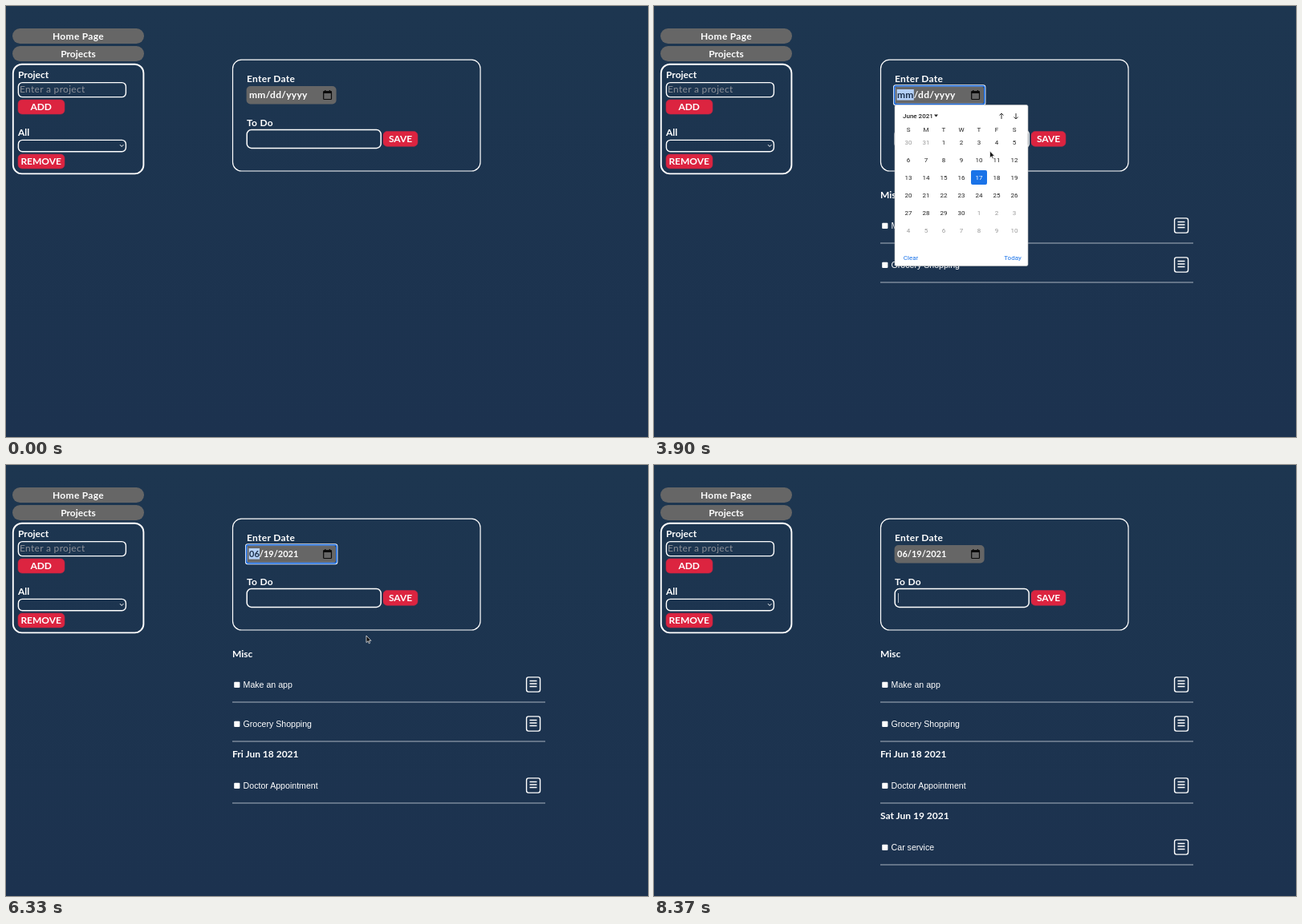
An HTML page for the animation above (8.4 s loop, 800 px wide and 538 px high).

```html
<!DOCTYPE html>
<html lang="en">
<head>
<meta charset="utf-8">
<title>To-do list</title>
<style>
  html, body { margin: 0; width: 100%; height: 100%; overflow: hidden; background: #1c3450; }
  svg { display: block; width: 800px; height: 538px; }
  text { font: 700 12px Lato, sans-serif; fill: #fff; white-space: pre; }
  .wide { letter-spacing: .3px; }
  .mid { text-anchor: middle; }
  .hint { font-weight: 400; fill: #8b8f97; }
  .typed { font-weight: 400; }
  .task { font: 10.6px "Liberation Sans", Arial, sans-serif; }
  .pill { fill: #666; }
  .btn { fill: #dc2440; stroke: #b82745; stroke-width: .6; }
  .box { fill: none; stroke: #fff; stroke-width: 1.4; }
  .rule { stroke: #a9b3bf; }
  .digits { font-size: 11px; }
  .picker text { font: 8px Roboto, sans-serif; fill: #222; }
  .picker .out { fill: #999; }
  .picker .sel { fill: #fff; }
  .picker .link { fill: #1a73e8; }
</style>
</head>
<body>
<svg viewBox="0 0 800 538">
  <defs>
    <linearGradient id="sky" x2="0" y2="1">
      <stop stop-color="#1d3650"/><stop offset="1" stop-color="#1c324f"/>
    </linearGradient>
    <g id="menu">
      <rect class="box" x="648.6" y="-9.1" width="17" height="18.2" rx="2.5"/>
      <path d="M652.5-4.6h9M652.5-1h9M652.5 2.6h9" stroke="#fff" stroke-width="1.5"/>
    </g>
  </defs>
  <rect width="800" height="538" fill="url(#sky)"/>

  <rect class="pill" x="8" y="28" width="164" height="19" rx="9.5"/>
  <rect class="pill" x="8" y="50" width="164" height="19" rx="9.5"/>
  <text class="mid wide" x="90" y="42">Home Page</text>
  <text class="mid" x="90" y="64">Projects</text>

  <rect class="box" x="8.8" y="72.8" width="162.6" height="136.6" rx="11" style="stroke-width:1.9"/>
  <text x="15" y="90.4">Project</text>
  <rect class="box" x="15.4" y="95.6" width="134" height="18" rx="5"/>
  <text class="hint wide" x="17" y="108">Enter a project</text>
  <rect class="btn" x="15" y="117" width="58" height="18" rx="5"/>
  <text class="mid" x="43.7" y="129.6">ADD</text>
  <text x="15" y="162.4">All</text>
  <rect class="box" x="15.4" y="167.4" width="134" height="14.4" rx="5"/>
  <path d="M142 173.2l2.2 2.3 2.2-2.3" fill="none" stroke="#fff"/>
  <rect class="btn" x="15" y="185" width="58" height="18" rx="5"/>
  <text class="mid" x="43.7" y="197.6">REMOVE</text>

  <rect class="box" x="282.5" y="67.2" width="308.6" height="138.8" rx="11" style="stroke-width:1.2"/>
  <text class="wide" x="300" y="95.3">Enter Date</text>
  <rect class="pill" x="299.6" y="100" width="112" height="22.4" rx="5"/>
  <g id="focus">
    <rect x="299.2" y="99.4" width="113" height="23.6" rx="2" fill="none" stroke="#fff" stroke-width="2.4"/>
    <rect x="299.6" y="99.8" width="112.2" height="22.8" rx="2" fill="none" stroke="#1769e0" stroke-width="1.6"/>
    <rect id="mark" x="302.6" y="104" height="13.6" fill="#b4d0f8"/>
  </g>
  <text id="date" x="303" y="114.7"><tspan id="month"></tspan><tspan id="rest"></tspan></text>
  <g fill="none" stroke="#0b0b0b">
    <rect x="395.7" y="106.7" width="9.8" height="9.8" rx=".8" stroke-width="1.2"/>
    <path d="M395.5 107.8h10.2" stroke-width="2.4"/>
    <path d="M397.8 105v2M403.4 105v2" stroke-width="1.3"/>
  </g>
  <text class="wide" x="300" y="149.7">To Do</text>
  <rect class="box" x="300.2" y="154.6" width="167" height="22.8" rx="5.5" style="stroke-width:1.5"/>
  <text class="typed" id="typed" x="304" y="169.3"></text>
  <path id="caret" d="M.5 160v12" stroke="#d5dae0" stroke-width=".8"/>
  <rect class="btn" x="470" y="156.5" width="43" height="18.8" rx="5"/>
  <text class="mid" x="491.6" y="169.6">SAVE</text>

  <g id="list"></g>
  <g id="picker" class="picker"></g>
  <path id="cursor" d="M0 0v8.6l2-1.8 1.3 3 1.3-.6-1.3-2.9h2.7z" fill="#111" stroke="#fff" stroke-width=".7"/>
</svg>
<script>
const LOOP = 8400;
const $ = id => document.getElementById(id);

// Each entry: typing start, ms per key, moment of saving, row centre
const entries = [
  { text: 'Make an app', start: 390, step: 60, save: 1200, y: 274, head: 'Misc', headY: 240 },
  { text: 'Grocery Shopping', start: 1530, step: 65, save: 2700, y: 323 },
  { text: 'Doctor Appointment', start: 4460, step: 38, save: 5280, y: 400, head: 'Fri Jun 18 2021', headY: 365.2 },
  { text: 'Car service', start: 6480, step: 42, save: 7020, y: 477, head: 'Sat Jun 19 2021', headY: 441.5 }
];

// Spans of time
const todoFocus = [[300, 3510], [4425, 5850], [6420, LOOP]];
const dateFocus = [[3510, 4425], [5850, 6420]];
const pickerOpen = [[3540, 4380], [5940, 6330]];

// Pointer paths: [time, x, y]
const paths = [
  [[60, 392, 250], [270, 380, 180]],
  [[3180, 365, 154], [3270, 371, 126], [3450, 400, 111], [3600, 400, 111],
   [4080, 427, 213], [4380, 427, 213], [4425, 400, 181]],
  [[5640, 385, 152], [5820, 407, 112], [5970, 407, 112],
   [6180, 449, 213], [6330, 449, 213], [6420, 400, 181]]
];

const within = (spans, t) => spans.some(([a, b]) => t >= a && t < b);
const show = (el, on) => el.setAttribute('visibility', on ? 'visible' : 'hidden');

for (const e of entries) {
  const head = e.head ? `<text x="282" y="${e.headY}">${e.head}</text>` : '';
  $('list').insertAdjacentHTML('beforeend', `<g>${head}
    <rect x="284.2" y="${e.y - 3.2}" width="7.2" height="7.2" rx="1" fill="#fff"/>
    <text class="task" x="295.6" y="${e.y + 3.8}">${e.text}</text>
    <use href="#menu" y="${e.y}"/>
    <path class="rule" d="M282 ${e.y + 22}h390"/></g>`);
  e.row = $('list').lastElementChild;
}

function drawPicker(day) {
  const label = (x, y, s, c = '') => `<text class="mid ${c}" x="${x}" y="${y}">${s}</text>`;
  let out = '<rect x="300" y="123.5" width="166" height="201" rx="2" fill="#fff" stroke="#bbb" stroke-width=".6"/>'
    + '<text x="310" y="140" style="font-weight:500">June 2021</text>'
    + '<path d="M349 135.5h5l-2.5 3z" fill="#222"/>'
    + '<path d="M433 141v-7m-2.5 2.5l2.5-2.5 2.5 2.5M451 134v7m-2.5-2.5l2.5 2.5 2.5-2.5" fill="none" stroke="#333"/>';
  [...'SMTWTFS'].forEach((d, i) => { out += label(317 + i * 22, 157, d); });
  for (let i = 0; i < 42; i++) {
    const x = 317 + i % 7 * 22, y = 173 + Math.floor(i / 7) * 22;
    const n = i - 1, inside = n > 0 && n < 31;
    if (n === day) out += `<rect x="${x - 10}" y="${y - 12}" width="20" height="18" rx="2" fill="#1a73e8"/>`;
    out += label(x, y, inside ? n : n > 30 ? n - 30 : n + 31, n === day ? 'sel' : inside ? '' : 'out');
  }
  $('picker').innerHTML = out + label(320, 317, 'Clear', 'link') + label(447, 317, 'Today', 'link');
}

function pointer(t) {
  const path = paths.find(p => t >= p[0][0] && t < p[p.length - 1][0]);
  show($('cursor'), path);
  if (!path) return;
  const i = path.findIndex(p => p[0] > t);
  const [t0, x0, y0] = path[i - 1], [t1, x1, y1] = path[i];
  const k = (t - t0) / (t1 - t0), s = k * k * (3 - 2 * k);
  $('cursor').setAttribute('transform', `translate(${x0 + (x1 - x0) * s} ${y0 + (y1 - y0) * s})`);
}

let shownDay;
function draw(t) {
  let typed = '', lastKey = 300;
  for (const e of entries) {
    show(e.row, t >= e.save);
    if (t < e.start) continue;
    const n = Math.min(Math.floor((t - e.start) / e.step) + 1, e.text.length);
    typed = t < e.save ? e.text.slice(0, n) : '';
    lastKey = t < e.save ? e.start + (n - 1) * e.step : e.save;
  }
  $('typed').textContent = typed;
  const width = typed ? $('typed').getComputedTextLength() : 0;
  $('caret').setAttribute('transform', `translate(${304 + width} 0)`);
  show($('caret'), within(todoFocus, t) && (t - lastKey) % 440 < 220);

  const day = t >= 6300 ? 19 : t >= 4350 ? 18 : 0;
  const focused = within(dateFocus, t);
  $('date').setAttribute('class', day ? 'digits' : 'wide');
  $('month').textContent = day ? '06' : 'mm';
  $('rest').textContent = day ? `/${day}/2021` : '/dd/yyyy';
  $('month').style.fill = focused ? '#1c2f4a' : '';
  $('mark').setAttribute('width', day ? 13.4 : 21.2);
  show($('focus'), focused);

  const picked = day || 17;
  if (picked !== shownDay) drawPicker(shownDay = picked);
  show($('picker'), within(pickerOpen, t));
  pointer(t);
}

const begin = performance.now();
function tick() {
  draw((performance.now() - begin) % LOOP);
  requestAnimationFrame(tick);
}
tick();
</script>
</body>
</html>
```
